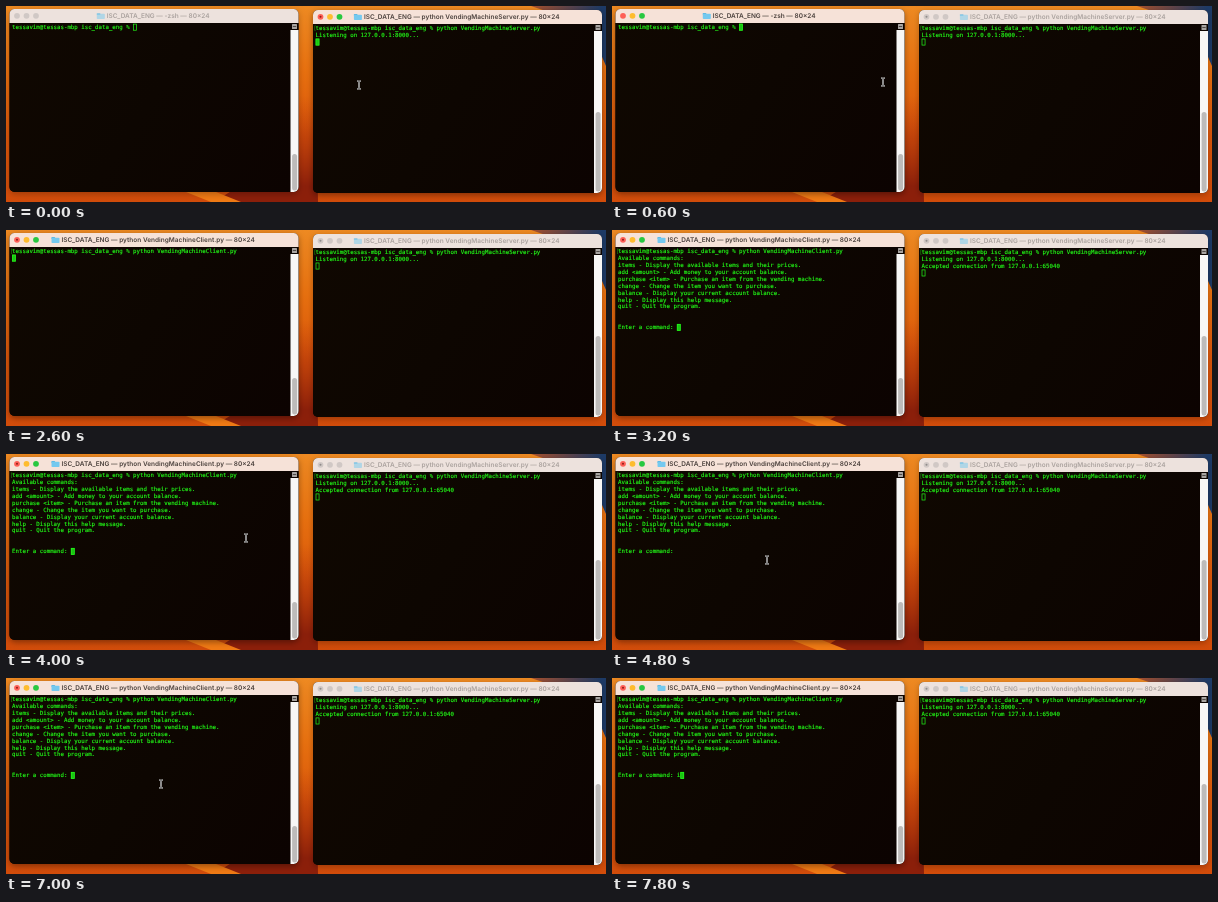
An HTML page with a canvas for the animation above (8000 ms loop, 600 px wide and 196 px high).

```html
<!DOCTYPE html>
<html lang="en">
<head>
<meta charset="utf-8">
<title>Two terminals</title>
<style>
  html, body { margin: 0; width: 100%; height: 100%; overflow: hidden; background: #d9560c; }
  canvas { display: block; width: 600px; height: 196px; }
</style>
</head>
<body>
<canvas id="stage" width="600" height="196"></canvas>
<script>
const ctx = document.getElementById('stage').getContext('2d');
const LOOP = 8000, STEP = 200;
const CELL_W = 3.457, CELL_H = 6.93, GREEN = '#22fb18';
const MONO = '"DejaVu Sans Mono", monospace', SANS = 'Inter, sans-serif';

const PROMPT = 'tessavim@tessas-mbp isc_data_eng % ';
const CLIENT = 'python VendingMachineClient.py';
const SERVER = 'python VendingMachineServer.py';
const HELP = [
  'Available commands:',
  'items - Display the available items and their prices.',
  'add <amount> - Add money to your account balance.',
  'purchase <item> - Purchase an item from the vending machine.',
  'change - Change the item you want to purchase.',
  'balance - Display your current account balance.',
  'help - Display this help message.',
  'quit - Quit the program.',
  '', ''
];

const FOCUS_AT = 400, ENTER_AT = 2400, CONNECT_AT = 2800, KEY_AT = 7800;
// [time, characters typed so far]; the long names are tab-completed
const TYPING = [[1000, 2], [1200, 6], [1400, 9], [1600, 21], [1800, 22], [2000, 30]];
// [time, x, y] of each pointer stroke
const POINTER = [
  [[0, 353, 79], [200, 330, 78], [400, 275, 76], [600, 271, 76], [1000, 271, 76]],
  [[4000, 240, 84], [4600, 155, 106], [KEY_AT, 155, 106]]
];

// Large type scaled down keeps fractional glyph advances.
const TYPE_SCALE = 20;
function setFont(size, family, weight = 400) {
  ctx.font = `${weight} ${size * TYPE_SCALE}px ${family}`;
  ctx.textRendering = 'geometricPrecision';
}
function text(str, x, y, color, stroke = 0) {
  ctx.save();
  ctx.translate(x, y);
  ctx.scale(1 / TYPE_SCALE, 1 / TYPE_SCALE);
  ctx.fillStyle = ctx.strokeStyle = color;
  ctx.fillText(str, 0, 0);
  if (stroke) {
    ctx.lineWidth = stroke * TYPE_SCALE;
    ctx.lineJoin = 'round';
    ctx.strokeText(str, 0, 0);
  }
  ctx.restore();
}
function rect(x, y, w, h, color, radius = 0) {
  ctx.fillStyle = color;
  ctx.beginPath();
  ctx.roundRect(x, y, w, h, radius);
  ctx.fill();
}
function dot(x, y, r, color) {
  ctx.fillStyle = color;
  ctx.beginPath();
  ctx.arc(x, y, r, 0, 7);
  ctx.fill();
}
function shape(path, color) {
  ctx.fillStyle = color;
  ctx.fill(new Path2D(path));
}
function gradient(x0, y0, x1, y1, ...colors) {
  const g = ctx.createLinearGradient(x0, y0, x1, y1);
  colors.forEach((c, i) => g.addColorStop(i / (colors.length - 1), c));
  return g;
}

function drawDesktop() {
  rect(0, 0, 600, 196, gradient(0, 0, 0, 196, '#ee8a22', '#e8700f', '#dc560a', '#d24c0a'));
  shape('M293 90L310 90L312 196H205Q262 172 293 90Z', gradient(0, 90, 0, 180, '#b8380a00', '#8c1f0a'));
  shape('M175 184L205 196H235L205 184Z', '#f07a14');
  shape('M525 0H600V60Q585 18 525 0Z', gradient(525, 0, 590, 20, '#a8502c', '#1d3a66'));
}

function drawTitle(win) {
  const { x, y, active, running } = win;
  const lights = active ? ['#fe5f57', '#febc2e', '#28c840'] : ['#d0c8c5', '#d0c8c5', '#d0c8c5'];
  lights.forEach((c, i) => dot(x + 7.5 + i * 9.5, y + 6.8, 2.9, c));
  if (running) dot(x + 7.5, y + 6.8, 1, active ? '#8f1d16' : '#908c8b');

  setFont(6.5, SANS, 600);
  const width = ctx.measureText(win.title).width / TYPE_SCALE;
  const left = x + 143.7 - (width + 10) / 2;
  ctx.globalAlpha = active ? 1 : .5;
  rect(left, y + 4, 3.5, 2, '#58b5e2', .6);
  rect(left, y + 4.7, 8, 5.3, '#74c9ef', .8);
  ctx.globalAlpha = 1;
  text(win.title, left + 10, y + 9.1, active ? '#4a403c' : '#aaa29e');
}

function drawScrollbar({ x, y, thumb }) {
  rect(x + 281, y + 21, 8, 162, '#f8f7f6', [0, 0, 5, 0]);
  rect(x + 282.6, thumb, 5, y + 181.5 - thumb, '#bdbbba', 2.5);
  rect(x + 282.5, y + 15, 5, 5, '#a8a4a1', .5);
  rect(x + 283.3, y + 17.1, 3.4, .8, '#3a3532');
}

function drawWindow(win) {
  const { x, y, active, lines } = win;
  ctx.save();
  ctx.shadowColor = active ? '#0006' : '#0004';
  ctx.shadowBlur = 6;
  ctx.shadowOffsetY = 2;
  rect(x, y, 289, 183, '#0c0501', 5);
  ctx.restore();

  rect(x, y, 289, 14, active ? '#f6e2d8' : '#ede2dd', [5, 5, 0, 0]);
  rect(x, y + 14, 289, 169, gradient(x, y, x + 281, y + 183, '#100801', '#0d0601', '#0c0301'), [0, 0, 5, 5]);
  drawTitle(win);
  drawScrollbar(win);

  const left = x + 2.6, top = y + 14.7;
  setFont(CELL_W / .602, MONO);
  lines.forEach((line, row) => text(line, left, top + row * CELL_H + 5.3, GREEN, .15));
  if (win.running) {
    ctx.globalAlpha = .6;
    text('[', x + .2, top + 5.3, GREEN);
    ctx.globalAlpha = 1;
  }

  const row = lines.length - 1;
  const cx = left + lines[row].length * CELL_W, cy = top + row * CELL_H;
  if (active && !win.cursorOn) return;
  if (active) rect(cx, cy, CELL_W + .2, CELL_H, '#1cc314');
  ctx.strokeStyle = GREEN;
  ctx.lineWidth = .7;
  ctx.strokeRect(cx + .4, cy + .4, CELL_W - .4, CELL_H - .8);
}

function pointerAt(t) {
  for (const path of POINTER) {
    for (let i = 1; i < path.length; i++) {
      const [t0, x0, y0] = path[i - 1], [t1, x1, y1] = path[i];
      if (t < t0 || t >= t1) continue;
      const k = (t - t0) / (t1 - t0);
      return [x0 + (x1 - x0) * k, y0 + (y1 - y0) * k];
    }
  }
  return null;
}

function drawPointer([x, y]) {
  const beam = new Path2D(
    `M${x - 2} ${y - 4}Q${x} ${y - 4} ${x} ${y - 2.6}Q${x} ${y - 4} ${x + 2} ${y - 4}` +
    `M${x} ${y - 2.8}V${y + 2.8}` +
    `M${x - 2} ${y + 4}Q${x} ${y + 4} ${x} ${y + 2.6}Q${x} ${y + 4} ${x + 2} ${y + 4}`);
  for (const [width, color] of [[1.7, '#d0d0d0'], [.5, '#222']]) {
    ctx.lineWidth = width;
    ctx.strokeStyle = color;
    ctx.stroke(beam);
  }
}

function clientLines(t) {
  const typed = TYPING.reduce((n, [at, count]) => t >= at ? count : n, 0);
  const lines = [PROMPT + CLIENT.slice(0, typed)];
  if (t >= CONNECT_AT) lines.push(...HELP, 'Enter a command: ' + (t >= KEY_AT ? 'i' : ''));
  else if (t >= ENTER_AT) lines.push('');
  return lines;
}

function serverLines(t) {
  const lines = [PROMPT + SERVER, 'Listening on 127.0.0.1:8000...'];
  if (t >= CONNECT_AT) lines.push('Accepted connection from 127.0.0.1:65040');
  return [...lines, ''];
}

const titleFor = command => `ISC_DATA_ENG — ${command} — 80×24`;

function draw(t) {
  const clientActive = t >= FOCUS_AT, clientRunning = t >= ENTER_AT;
  const blinkOn = t < 2900 || t >= KEY_AT || (t - 2900) % 1000 < 500;
  const client = {
    x: 3.5, y: 3, thumb: 148, active: clientActive, running: clientRunning, cursorOn: blinkOn,
    title: titleFor(clientRunning ? CLIENT : '-zsh'), lines: clientLines(t)
  };
  const server = {
    x: 307, y: 4, thumb: 106, active: !clientActive, running: true, cursorOn: true,
    title: titleFor(SERVER), lines: serverLines(t)
  };
  drawDesktop();
  for (const win of clientActive ? [server, client] : [client, server]) drawWindow(win);
  const pointer = pointerAt(t);
  if (pointer) drawPointer(pointer);
}

const start = performance.now();
function tick() {
  const t = (performance.now() - start) % LOOP;
  draw(Math.floor(t / STEP) * STEP);
  requestAnimationFrame(tick);
}
tick();
</script>
</body>
</html>
```
